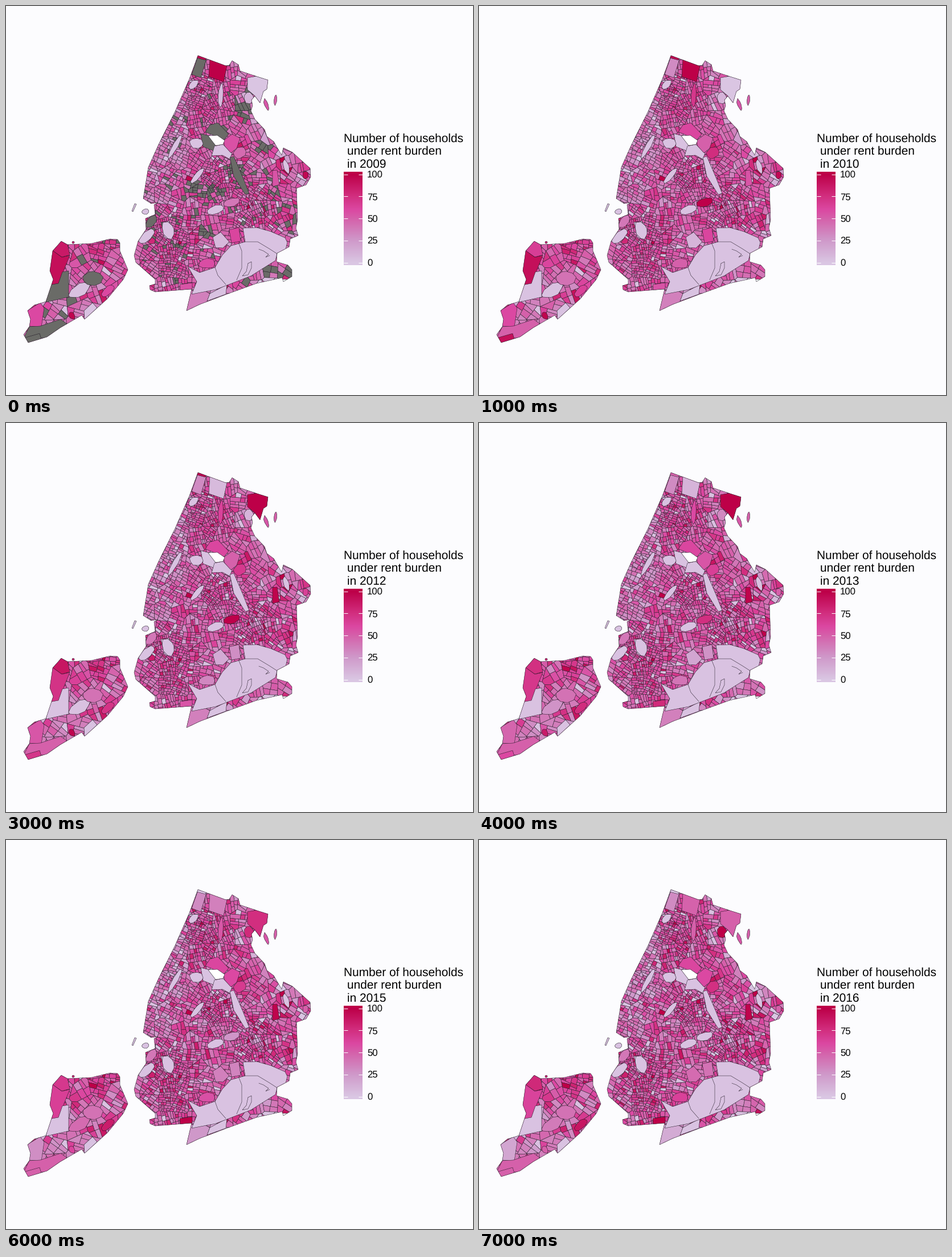
Write a matplotlib script that moves like this. It is 820x683 px and loops after 8000 ms.

```python
import matplotlib.pyplot as plt
import numpy as np
from matplotlib.animation import FuncAnimation
from matplotlib.collections import PolyCollection
from matplotlib.colors import LinearSegmentedColormap
from matplotlib.patches import Polygon

W, H, DPI = 820, 683, 64
PT = 72 / DPI
YEARS = np.arange(2009, 2017)
INK = "#1c1420"
EDGE = 0.5 * PT

plt.rcParams["font.family"] = "Liberation Sans"
plt.rcParams["text.hinting"] = "no_hinting"
rng = np.random.default_rng(29)

cmap = LinearSegmentedColormap.from_list("burden", [
    (0, "#dac6e3"), (0.25, "#cf99ca"), (0.5, "#d560aa"),
    (0.6, "#db48a2"), (0.75, "#d22f80"), (1, "#bd0048")])
cmap.set_bad("#6a6b67")

fig = plt.figure(figsize=(W / DPI, H / DPI), dpi=DPI, facecolor="#fcfcfe")
ax = fig.add_axes([0, 0, 1, 1])
ax.axis("off")


# ---- geometry helpers
def points(*flat):
    return np.array(flat, float).reshape(-1, 2)


def axes_at(angle):
    a = np.radians(angle)
    u = np.array([np.cos(a), np.sin(a)])
    return u, np.array([-u[1], u[0]])


def blob(x, y, length, width, angle=0, n=9):
    """Irregular rounded shape around a centre."""
    t = (np.arange(n) + rng.uniform(-0.25, 0.25, n)) * 2 * np.pi / n
    r = rng.uniform(0.45, 0.58, n)
    u, v = axes_at(angle)
    return (np.array([x, y]) + np.outer(r * length * np.cos(t), u)
            + np.outer(r * width * np.sin(t), v))


def clip(poly, p, n):
    """Keep the part of a convex polygon behind the line through p."""
    d = (poly - p) @ n
    out = []
    for i in range(len(poly)):
        a, b = poly[i - 1], poly[i]
        if d[i - 1] * d[i] < 0:
            out.append(a + (b - a) * d[i - 1] / (d[i - 1] - d[i]))
        if d[i] <= 0:
            out.append(b)
    return np.array(out).reshape(-1, 2)


def area(poly):
    x, y = poly.T
    return abs(x @ np.roll(y, 1) - y @ np.roll(x, 1)) / 2


def split(poly, angle, size):
    """Halve a block along its street grid until the pieces are small."""
    if len(poly) < 3:
        return []
    if area(poly) < size ** 2 * rng.uniform(0.7, 1.8):
        return [poly]
    u, v = axes_at(angle + rng.normal(0, 4))
    n = u if np.ptp(poly @ u) > 1.5 * np.ptp(poly @ v) else v
    s = poly @ n
    t = s.min() + np.ptp(s) * rng.uniform(0.38, 0.62)
    return (split(clip(poly, n * t, n), angle, size)
            + split(clip(poly, n * t, -n), angle, size))


# ---- coastlines
north_shore = points(
    337, 87, 386, 105, 392, 104, 397, 96, 408, 103, 411, 114, 441, 124,
    460, 130, 458, 146, 452, 150, 446, 170, 437, 158, 431, 165, 433, 175,
    430, 184, 437, 199, 454, 217, 458, 229, 470, 238, 484, 262, 487, 249,
    503, 257, 534, 285, 535, 300, 527, 314, 510, 320, 512, 375, 509, 390,
    513, 403, 499, 409, 497, 423, 476, 434, 475, 449, 495, 455, 502, 463,
    502, 475, 487, 484, 485, 477)
south_shore = points(
    440, 487, 385, 507, 340, 524, 317, 535, 326, 497, 262, 502, 253, 498,
    252, 491, 262, 488, 262, 480, 228, 450, 225, 438, 232, 413, 246, 392,
    245, 373, 262, 366, 260, 349, 267, 345, 255, 347, 241, 338, 250, 283,
    268, 243, 297, 185, 322, 128)
mainland = np.vstack([north_shore, south_shore])
island = points(
    82, 430, 97, 413, 108, 419, 150, 417, 183, 409, 196, 410, 200, 416,
    200, 430, 214, 463, 206, 480, 178, 514, 138, 550, 133, 543, 95, 565,
    72, 581, 39, 591, 31, 577, 41, 563, 43, 550, 38, 535, 50, 525, 70, 519,
    83, 480, 77, 465)

# ---- large tracts, each with values at a few key years
tracts = []


def tract(poly, levels, gap=False):
    """A gap tract has no data in the first year."""
    vals = np.interp(YEARS, list(levels), list(levels.values()))
    if gap:
        vals[0] = np.nan
    tracts.append((poly, vals))


EMPTY = {2009: 2}
tract(points(337, 89, 352, 93, 342, 126, 326, 120), {2010: 31}, gap=True)
tract(points(337, 86, 352, 91, 350, 95, 335, 91), {2012: 96, 2014: 2})
tract(points(358, 93, 388, 105, 382, 133, 356, 124),
      {2010: 100, 2011: 4, 2013: 10, 2016: 49})
tract(points(424, 126, 441, 123, 462, 130, 459, 147, 446, 171, 436, 157,
             424, 147), {2011: 1, 2012: 100, 2014: 100, 2016: 50})
tract(blob(427, 162, 20, 16, 90), {2012: 10, 2016: 100})
tract(blob(377, 157, 40, 9, 95), {2009: 6, 2010: 70, 2016: 50})
tract(points(358, 209, 372, 205, 391, 225, 383, 235, 350, 221),
      {2010: 61}, gap=True)
tract(points(342, 224, 357, 228, 369, 246, 364, 254, 346, 247),
      EMPTY, gap=True)
tract(points(366, 246, 381, 243, 397, 258, 393, 269, 380, 262, 361, 263),
      EMPTY)
tract(points(393, 266, 400, 264, 416, 301, 427, 329, 420, 331, 400, 299),
      EMPTY, gap=True)
tract(points(382, 236, 397, 225, 411, 232, 405, 250, 395, 258, 384, 246),
      {2009: 56, 2011: 44, 2014: 60})
tract(blob(410, 258, 24, 19, -45), {2009: 45, 2010: 76, 2014: 62, 2016: 74})
tract(points(418, 228, 424, 225, 431, 240, 424, 243),
      {2010: 60, 2011: 91, 2016: 70})
tract(points(468, 289, 476, 288, 480, 314, 468, 317), {2011: 55, 2012: 98})
tract(blob(526, 297, 14, 10, 90), {2010: 95, 2013: 50})
tract(blob(396, 345, 30, 14, -15), {2009: 40, 2010: 99, 2012: 99, 2016: 2})
tract(blob(255, 379, 24, 14, -60), {2010: 40}, gap=True)
tract(points(363, 406, 377, 397, 392, 414, 381, 425, 368, 424),
      {2009: 8, 2013: 18, 2016: 45})
tract(points(392, 393, 409, 389, 412, 413, 396, 416),
      {2011: 62, 2012: 30, 2014: 26, 2016: 42})
tract(blob(353, 452, 30, 17), {2009: 58, 2012: 33, 2016: 64})
tract(points(305, 489, 327, 486, 327, 497, 306, 499), {2012: 55, 2014: 100})
tract(points(316, 537, 324, 500, 345, 498, 358, 505, 352, 522),
      {2014: 36, 2016: 15})
tract(points(358, 505, 388, 489, 386, 506, 353, 518), EMPTY)

# parks and graveyards: centre, length, width, angle
for park in [(296, 248, 46, 9, -60), (329, 138, 20, 12, -40),
             (334, 241, 22, 18, 0), (336, 298, 32, 10, -50),
             (367, 358, 32, 15, -20), (285, 394, 32, 20, 70),
             (246, 405, 36, 14, -40), (492, 282, 26, 9, 70)]:
    tract(blob(*park), EMPTY)

bay = points(319, 457, 340, 468, 367, 459, 380, 437, 395, 421, 420, 414,
             416, 390, 440, 389, 465, 396, 490, 407, 494, 415, 491, 427,
             476, 435, 473, 447, 430, 474, 368, 498, 326, 506, 335, 484)
tract(bay, EMPTY)

tract(points(82, 430, 90, 418, 97, 412, 108, 418, 112, 437, 98, 441),
      {2009: 86, 2010: 66, 2012: 88, 2014: 61, 2016: 78})
tract(points(80, 428, 98, 441, 112, 438, 99, 470, 92, 490, 77, 489, 76, 465),
      {2010: 92, 2011: 75, 2016: 63})
tract(points(76, 490, 92, 487, 99, 467, 110, 465, 110, 511, 70, 520),
      EMPTY, gap=True)
tract(blob(129, 499, 40, 20, -30), {2012: 3, 2014: 52, 2016: 38})
tract(blob(152, 478, 34, 26), {2010: 42}, gap=True)
tract(points(137, 535, 152, 521, 160, 530, 138, 552), EMPTY)
tract(points(37, 535, 60, 521, 67, 530, 62, 564, 41, 562),
      {2011: 60, 2014: 42, 2016: 18})
tract(points(41, 563, 60, 562, 96, 550, 107, 558, 72, 583, 31, 583),
      {2010: 50}, gap=True)
tract(points(31, 583, 59, 575, 62, 585, 40, 593), {2010: 92, 2014: 50},
      gap=True)
tract(blob(116, 544, 14, 9, 60), {2012: 97, 2016: 50})
tract(blob(179, 500, 27, 13, -40), {2009: 60, 2016: 88})


# ---- districts
CORES = points(350, 165, 375, 300, 290, 400, 290, 450, 430, 355)
GAPS = points(418, 187, 455, 247, 403, 290, 330, 322, 362, 328, 470, 467,
              490, 467, 352, 396)


def nearest(p, spots):
    return np.hypot(*(spots - p).T).min()


def main_district(p):
    """Street angle, tract size and mean value around a point."""
    x, y = p
    if y < 345 and x < 338 - 0.19 * (y - 110):
        return 26, 7.5, 38
    size = np.clip(5.6 + 0.08 * (nearest(p, CORES) - 20), 5.6, 12.5)
    angle = 36 if x < 275 else rng.choice([5, 20, 35, 65, 80])
    return angle, size, 53 - 1.1 * (size - 6)


def isle_district(p):
    shore = p[1] < 432
    return rng.uniform(0, 90), 9 if shore else 13, 62 if shore else 48


def make_cells(outline, step, district):
    """Jittered seeds own convex districts, which are split into tracts."""
    coast = Polygon(outline).get_path()
    (x0, y0), (x1, y1) = outline.min(0) - 2, outline.max(0) + 2
    grid = np.array([(x, y) for y in np.arange(y0, y1, step)
                     for x in np.arange(x0, x1, step)])
    seeds = grid + rng.uniform(-0.35, 0.35, grid.shape) * step
    cells, means = [], []
    for here in seeds:
        home = points(x0, y0, x1, y0, x1, y1, x0, y1)
        for there in seeds:
            if 0 < np.hypot(*(there - here)) < 4 * step:
                home = clip(home, (here + there) / 2, there - here)
        angle, size, mean = district(here)
        for c in split(home, angle, size):
            if coast.contains_points(np.vstack([c, c.mean(0)])).any():
                cells.append(c)
                means.append(mean)
    return cells, np.array(means, float)


def make_values(cells, means):
    """Each tract starts near its mean and drifts from year to year."""
    n = len(cells)
    mid = np.array([c.mean(0) for c in cells])
    east = (mid[:, 0] > 440) & (mid[:, 1] < 400)
    base = means + np.where(east, 15, 10) * rng.normal(size=n)
    vals = base[:, None] + rng.normal(0, 4, (n, len(YEARS))).cumsum(1)
    vals[rng.random(n) < 0.025] += 28
    vals[rng.random(n) < 0.03] = 3
    near = np.array([nearest(m, GAPS) < 15 for m in mid])
    vals[rng.random(n) < np.where(near, 0.7, 0.06), 0] = np.nan
    return vals.clip(0, 100)


# ---- map layers
layers = []


def add_layer(polys, vals, outline=None):
    layer = PolyCollection(polys, edgecolors=INK, linewidths=EDGE, zorder=2)
    ax.add_collection(layer, autolim=False)
    if outline is not None:
        coast = Polygon(outline, fill=False, ec=INK, lw=EDGE, zorder=3)
        ax.add_patch(coast)
        layer.set_clip_path(coast)
    layers.append((layer, np.ma.masked_invalid(np.array(vals) / 100)))


def add_land(outline, step, district, big):
    cells, means = make_cells(outline, step, district)
    vals = make_values(cells, means)
    add_layer(cells + [p for p, _ in big],
              np.vstack([vals] + [v for _, v in big]), outline)


add_land(mainland, 27, main_district,
         [t for t in tracts if t[0][0, 0] > 220])
add_land(island, 32, isle_district,
         [t for t in tracts if t[0][0, 0] < 220])

islets = [points(221, 360, 226, 347, 229, 348, 223, 361),
          blob(245, 361, 13, 9, -20), blob(457, 173, 20, 6, 70),
          blob(473, 165, 18, 5, 95), blob(118, 415, 4, 4)]
add_layer(islets, [[v] * len(YEARS) for v in (2, 2, 54, 50, 80)])

# ---- water lines and the airfield hole
ax.add_patch(Polygon(points(355, 228, 371, 227, 384, 236, 381, 243, 368, 245),
                     fc="white", ec=INK, lw=EDGE, zorder=3))
for line in (points(367, 459, 372, 473, 386, 489),
             points(408, 415, 414, 430, 414, 460, 405, 481),
             points(420, 414, 442, 414, 462, 426, 476, 435),
             points(444, 427, 452, 430, 461, 436, 456, 441, 463, 438),
             points(425, 452, 431, 449, 431, 460, 425, 472, 415, 474,
                    422, 466, 425, 452)):
    ax.plot(*line.T, color=INK, lw=EDGE, zorder=3)

# ---- legend
LEFT, RIGHT, TOP, BOTTOM = 593, 626, 291, 455
ramp = np.clip(np.linspace(1.026, -0.026, BOTTOM - TOP), 0, 1)[:, None]
ax.imshow(ramp, cmap=cmap, vmin=0, vmax=1, aspect="auto",
          extent=(LEFT, RIGHT, BOTTOM, TOP), zorder=2)
for v in range(0, 101, 25):
    y = 451.2 - 1.557 * v
    for x in (LEFT, RIGHT - 6.6):
        ax.plot([x, x + 6.6], [y, y], color="white", lw=PT, zorder=4,
                solid_capstyle="butt")
    ax.text(634, y + 6, str(v), size=16.8 * PT, color="black")


def title_line(row, text):
    x = LEFT + (5.8 if row else 0)
    return ax.text(x, 238.3 + 22.5 * row, text, size=20.9 * PT, color="black")


title_line(0, "Number of households")
title_line(1, "under rent burden")
year_text = title_line(2, "")

ax.set_xlim(0, W)
ax.set_ylim(H, 0)


def draw(i):
    for layer, vals in layers:
        layer.set_facecolor(cmap(vals[:, i]))
    year_text.set_text(f"in {YEARS[i]}")
    return [layer for layer, _ in layers] + [year_text]


anim = FuncAnimation(fig, draw, frames=len(YEARS), init_func=lambda: draw(0),
                     interval=1000, repeat=True, repeat_delay=0)
plt.show()
```
